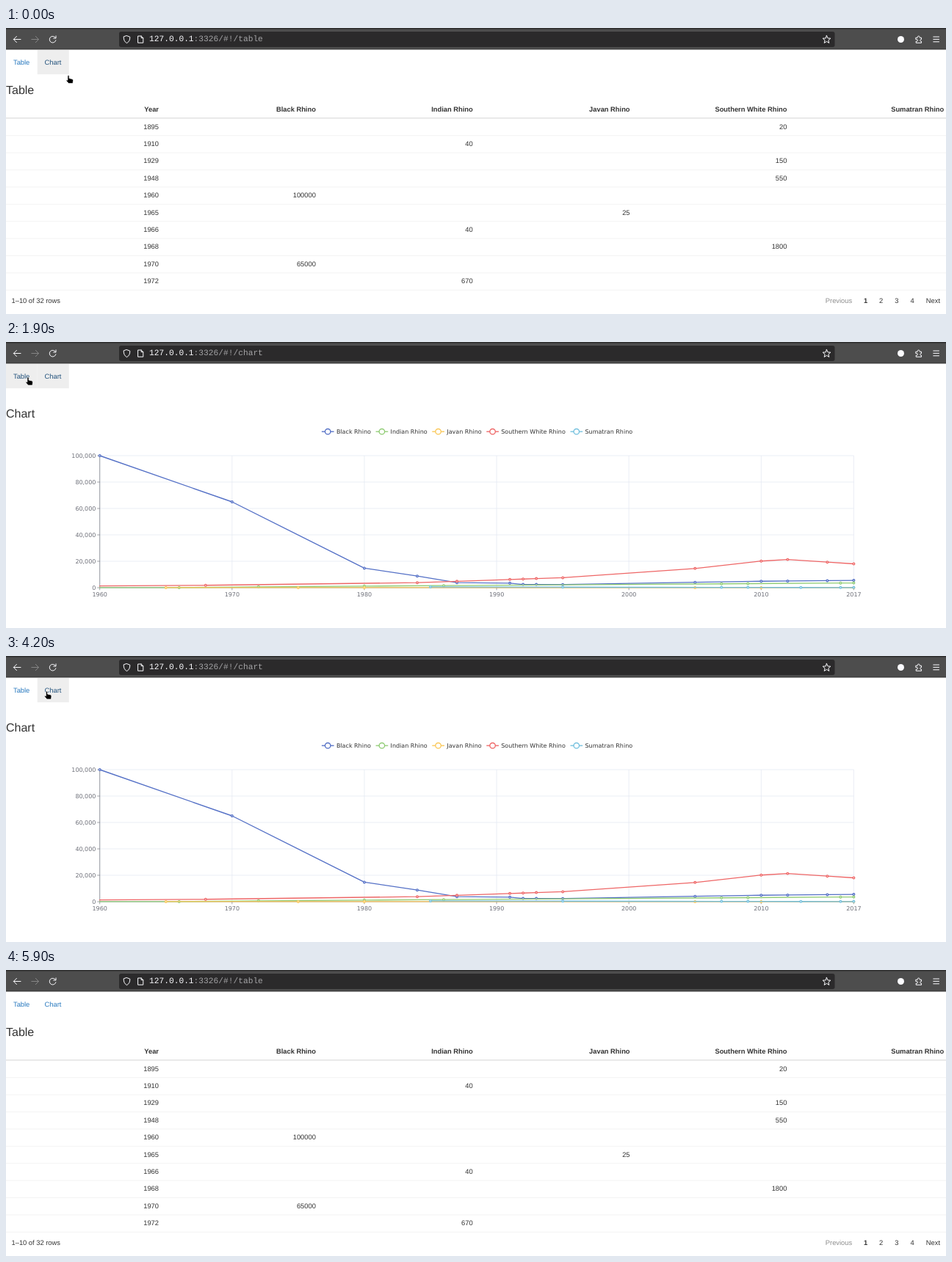
These frames come from a looping animation (1280 px wide and 390 px high, 6.1 s). An HTML page:

```html
<!DOCTYPE html>
<html lang="en">
<head>
<meta charset="utf-8">
<title>Rhino table and chart</title>
<style>
  html, body { margin: 0; width: 100%; height: 100%; overflow: hidden; background: #fff; }
  svg { display: block; width: 1280px; height: 390px; text-rendering: geometricPrecision; }
  text { font: 9.333px "Liberation Sans", Arial, sans-serif; fill: #333; white-space: pre; }
  .bold { font-weight: bold; }
  .title { font-size: 16px; }
  .muted { fill: #8c8c8c; }
  .url { font: 11.23px "Liberation Mono", monospace; fill: #fbfbfe; }
  .path { fill: #a3a3a5; }
  .small { font: 8px "DejaVu Sans", sans-serif; }
  .axis { fill: #6e7079; }
  .tab rect { fill: none; }
  .tab text { fill: #2a7abf; }
  .tab.on rect { fill: #eee; }
  .tab.on text { fill: #23527c; }
  .icon { fill: none; stroke: #fbfbfe; stroke-linecap: round; stroke-linejoin: round; }
</style>
</head>
<body>
<svg viewBox="0 0 1280 390">
  <rect width="1280" height="29.3" fill="#4d4d4d"/>
  <rect width="1280" height="1.5" fill="#2c2c2c"/>
  <rect y="28.3" width="1280" height="1" fill="#3a3a3a"/>
  <rect x="154" y="5" width="974.5" height="21" rx="2.7" fill="#2b2a2b"/>
  <g class="icon">
    <path d="M20 15.5H10.5M14.5 11.3L10.3 15.5L14.5 19.7"/>
    <path d="M34.8 15.5H44.3M40.3 11.3L44.5 15.5L40.3 19.7" stroke="#858585"/>
    <path d="M67.5 13.5A4.4 4.4 0 1 0 67.9 16.8M68 10.8V14H64.8"/>
    <path d="M164.5 10.6L168.8 12.2C168.8 16.5 167.5 18.9 164.5 20.6C161.5 18.9 160.2 16.5 160.2 12.2Z"/>
    <path d="M180 11H184.2L186.8 13.6V20.2H180ZM184.2 11V13.6H186.8"/>
    <path id="star"/>
    <path d="M1239.2 13.2H1241.3V12.4A1.4 1.4 0 0 1 1244.1 12.4V13.2H1246.5V15.6H1245.6A1.4 1.4 0 0 0 1245.6 18.2H1246.5V20.3H1239.2V18.1H1240.2A1.3 1.3 0 0 0 1240.2 15.5H1239.2Z"/>
    <path d="M1262.8 12H1270.5M1262.8 15.4H1270.5M1262.8 18.8H1270.5"/>
  </g>
  <circle cx="1218.5" cy="15.5" r="4.5" fill="#fbfbfe"/>
  <text class="url" x="195" y="18.3">127.0.0.1<tspan class="path" id="route"></tspan></text>

  <g class="tab" id="tableTab"><rect y="30" width="42.7" height="33.2"/><text x="10" y="49.5">Table</text></g>
  <g class="tab" id="chartTab"><rect x="42.7" y="30" width="43" height="33.2"/><text x="52.6" y="49.5">Chart</text></g>

  <g id="table"></g>
  <g id="chart"></g>

  <g id="cursor" stroke="#fff" stroke-width=".7" stroke-linejoin="round">
    <path id="hand" d="M-1.1 1.1Q-1.1 0 0 0T1.1 1.1V4L4.8 4.8Q6.7 5.2 6.5 7L6 11H.2L-2.8 7.5Q-3.3 6.4-2.3 6.1L-1.1 6.7Z"/>
    <path id="arrow" d="M0 0V11.3L2.6 9L4.3 13L6.1 12.2L4.4 8.3H8Z"/>
  </g>
</svg>
<script>
const $ = id => document.getElementById(id);
const text = (x, y, str, cls = "", anchor = "start") =>
  `<text x="${x}" y="${y}" class="${cls}" text-anchor="${anchor}">${str}</text>`;
const line = (x1, y1, x2, y2, color, width = 0.67) =>
  `<path d="M${x1} ${y1}L${x2} ${y2}" stroke="${color}" stroke-width="${width}"/>`;
const ring = (x, y, r, color) =>
  `<circle cx="${x}" cy="${y}" r="${r}" fill="#fff" stroke="${color}" stroke-width="1.33"/>`;

// Counts at key years; the other survey years are interpolated between them.
const africa = [1987, 1991, 1992, 1993, 1995, 2005, 2010, 2012, 2015];
const species = [
  { name: "Black Rhino", color: "#5470c6", surveys: africa,
    counts: { 1960: 100000, 1970: 65000, 1980: 14785, 1984: 8800, 1987: 3800, 1991: 3450, 1992: 2475, 1995: 2410, 2010: 4880, 2017: 5495 } },
  { name: "Indian Rhino", color: "#91cc75", surveys: [1980, 1986, 2007, 2009, 2016],
    counts: { 1910: 40, 1966: 40, 1972: 670, 2017: 3560 } },
  { name: "Javan Rhino", color: "#fac858", surveys: [1975, 1980, 2005, 2010],
    counts: { 1965: 25, 2017: 63 } },
  { name: "Southern White Rhino", color: "#ee6666", surveys: africa,
    counts: { 1895: 20, 1929: 150, 1948: 550, 1968: 1800, 1984: 3800, 1995: 7563, 2005: 14540, 2010: 20160, 2012: 21320, 2017: 18050 } },
  { name: "Sumatran Rhino", color: "#73c0de", surveys: [1995, 2007, 2009, 2013, 2016],
    counts: { 1985: 600, 2017: 90 } },
];

function samples({ counts, surveys }) {
  const known = Object.keys(counts).map(Number);
  const years = [...new Set([...known, ...surveys])].sort((a, b) => a - b);
  return years.map(year => {
    const before = known.findLast(k => k <= year), after = known.find(k => k >= year);
    const part = (year - before) / (after - before || 1);
    return [year, counts[before] + (counts[after] - counts[before]) * part];
  });
}

function drawStar() {
  const points = Array.from({ length: 10 }, (_, i) => {
    const r = i % 2 ? 2.5 : 5.6, a = (i / 5 - 0.5) * Math.PI;
    return [1117.5 + r * Math.cos(a), 15.9 + r * Math.sin(a)].map(v => v.toFixed(2));
  });
  $("star").setAttribute("d", `M${points.join("L")}Z`);
}

function drawTable() {
  const rows = species
    .flatMap((kind, i) => samples(kind).map(([year, count]) => ({ year, count, column: i + 1 })))
    .sort((a, b) => a.year - b.year).slice(0, 10);
  const right = column => 208 + 213.85 * column;
  let out = text(0, 90.3, "Table", "title") + text(right(0), 114.3, "Year", "bold", "end");
  species.forEach(({ name }, i) => out += text(right(i + 1), 114.3, name, "bold", "end"));
  out += line(0, 122.8, 1280, 122.8, "#ddd", 1.33);
  rows.forEach(({ year, count, column }, i) => {
    const y = 137.6 + 23.4 * i;
    out += text(right(0), y, year, "", "end") + text(right(column), y, count, "", "end");
    out += line(0, y + 9.1, 1280, y + 9.1, "#eee");
  });
  out += text(7.5, 374.7, "1–10 of 32 rows") + text(1115.8, 374.7, "Previous", "muted");
  for (let page = 1; page <= 4; page++)
    out += text(1149.3 + 21.2 * page, 374.7, page, page === 1 ? "bold" : "", "middle");
  $("table").innerHTML = out + text(1252.8, 374.7, "Next");
}

function legend() {
  const pen = document.createElement("canvas").getContext("2d");
  pen.font = '80px "DejaVu Sans", sans-serif';
  const widths = species.map(({ name }) => 20 + pen.measureText(name).width / 10);
  const gap = 6.67;
  let x = 641.5 - (widths.reduce((a, b) => a + b) + gap * 4) / 2;
  return species.map(({ name, color }, i) => {
    const item = line(x, 122.2, x + 16.7, 122.2, color, 1.33) + ring(x + 8.3, 122.2, 3.73, color)
      + text(x + 20, 125, name, "small");
    x += widths[i] + gap;
    return item;
  }).join("");
}

function drawChart() {
  const left = 127.7, right = 1154.4, top = 155, bottom = 335;
  const px = year => left + (year - 1960) * (right - left) / 57;
  const py = count => bottom - count * (bottom - top) / 100000;
  const gray = "#6e7079", pale = "#e0e6f1";
  let grid = "", axes = line(left, top, left, bottom, gray) + line(left, bottom, right, bottom, gray);

  for (let decade = 1960; decade <= 2020; decade += 10) {
    const year = Math.min(decade, 2017), x = px(year);
    grid += line(x, top, x, bottom, pale);
    axes += line(x, bottom, x, bottom + 3.3, gray) + text(x, 347, year, "small axis", "middle");
  }
  for (let count = 0; count <= 100000; count += 20000) {
    const y = py(count);
    grid += line(left, y, right, y, pale);
    axes += line(left - 3.4, y, left, y, gray) + text(122.4, y + 2.9, count.toLocaleString("en-US"), "small axis", "end");
  }
  const plots = species.map(kind => {
    const points = samples(kind).map(([year, count]) => [px(year), py(count)]);
    const rings = points.filter(([x]) => x >= left).map(([x, y]) => ring(x, y, 1.33, kind.color));
    return `<polyline points="${points.join(" ")}" fill="none" stroke="${kind.color}" stroke-width="1.33"
      stroke-linejoin="bevel" clip-path="url(#plot)"/>` + rings.join("");
  });
  $("chart").innerHTML = text(0, 103.3, "Chart", "title") + legend() + grid + axes
    + `<clipPath id="plot"><rect x="127" y="154" width="1028.2" height="182"/></clipPath>` + plots.join("");
}

const loop = 6100, tick = 100, leave = 5900;
const clicks = [1100, 2300, 3700, 4800]; // alternately Chart and Table
// Pointer glides: start ms, number of ticks, end point
const glides = [
  { start: 600, ticks: 3, x: 64, y: 50.5 },
  { start: 1700, ticks: 3, x: 30, y: 48 },
  { start: 2900, ticks: 3, x: 58.5, y: 48 },
  { start: 4200, ticks: 5, x: 29.4, y: 47.6 },
  { start: 5300, ticks: 2, x: 29.4, y: 44.6 },
];
const smooth = t => t * t * (3 - 2 * t);
const pageAt = time => clicks.filter(click => click <= time).length % 2 ? "chart" : "table";
const show = (id, visible) => $(id).setAttribute("visibility", visible ? "visible" : "hidden");

function pointerAt(time) {
  let x = 85, y = 64.6;
  for (const glide of glides) {
    const step = Math.floor((time - glide.start) / tick) + 1;
    const part = smooth(Math.min(Math.max(step / glide.ticks, 0), 1));
    x += (glide.x - x) * part;
    y += (glide.y - y) * part;
  }
  const shape = time >= leave ? "none" : time >= tick && time < glides[0].start ? "arrow" : "hand";
  return { x, y, shape };
}

function render(time) {
  const route = pageAt(time), view = pageAt(time - tick);
  const { x, y, shape } = pointerAt(time);
  const focus = time >= clicks[0] && time < leave ? route : "";
  const hover = shape !== "hand" ? "" : x < 42.7 ? "table" : "chart";
  for (const name of ["table", "chart"]) {
    show(name, view === name);
    $(name + "Tab").classList.toggle("on", hover === name || focus === name);
  }
  $("route").textContent = ":3326/#!/" + route;
  $("cursor").setAttribute("transform", `translate(${x} ${y})`);
  show("hand", shape === "hand");
  show("arrow", shape === "arrow");
}

drawStar();
drawTable();
drawChart();
const start = performance.now();
function frame() {
  render((performance.now() - start) % loop);
  requestAnimationFrame(frame);
}
frame();
</script>
</body>
</html>
```
